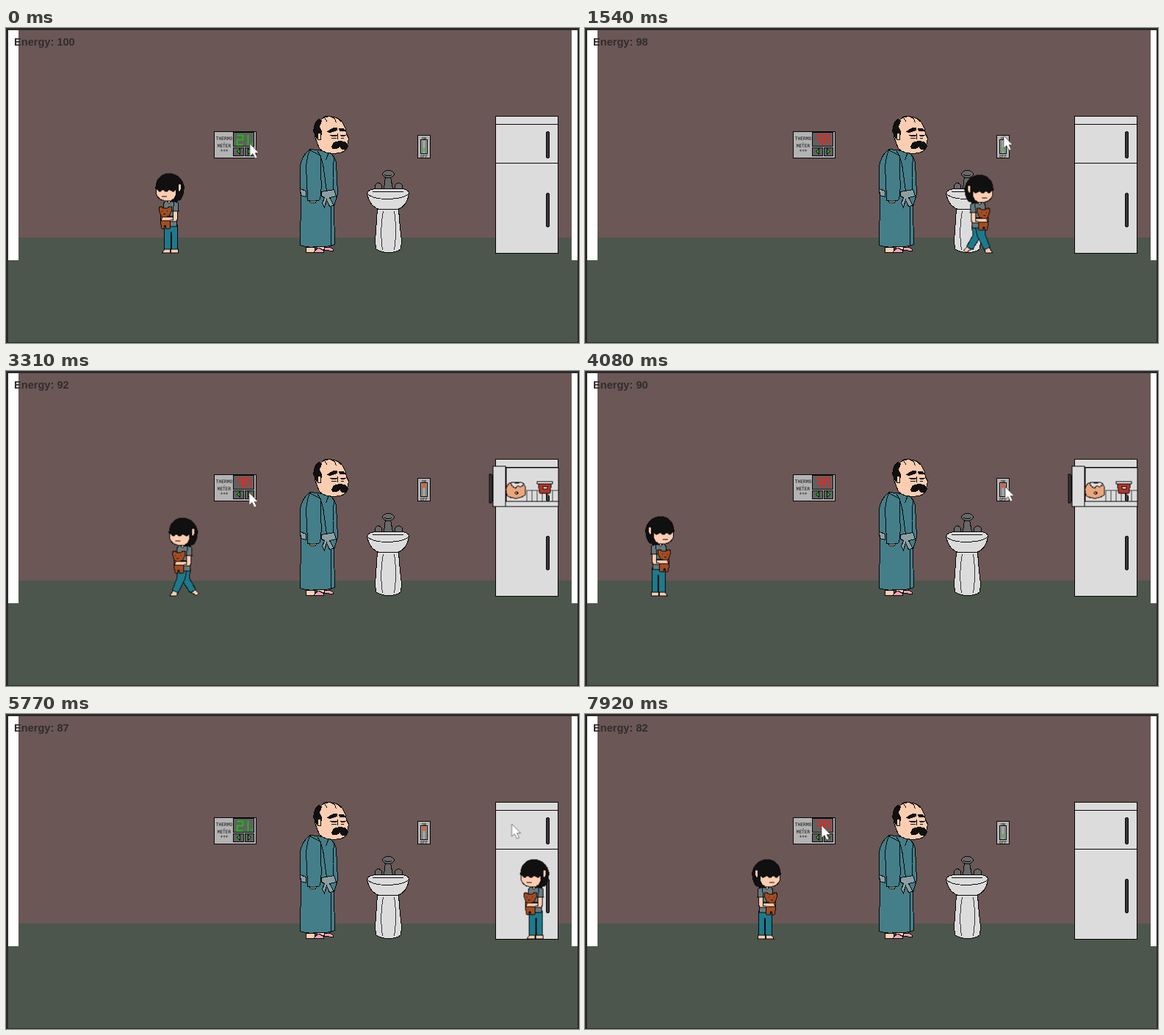
Animation of 780x430 px, one loop 8000 ms. Source, as an HTML page without scripts:

```html
<!DOCTYPE html>
<html lang="en">
<head>
<meta charset="utf-8">
<title>Room</title>
<style>
  @property --energy { syntax: "<integer>"; inherits: false; initial-value: 100; }
  html, body { margin: 0; width: 100%; height: 100%; overflow: hidden; background: #2b2b2b; }
  svg { position: absolute; left: 0; top: 0; display: block; }
  .art { stroke: #080808; stroke-width: 1; shape-rendering: crispEdges; }
  .flat { stroke: none; }
  .line { fill: none; }
  .skin { fill: #fccdb1; }
  .hair { fill: #101010; }
  .metal { fill: #686868; }
  .light { fill: #dcdcdc; }
  .robe { fill: #447e89; }
  .belt { fill: #8b9fa2; }
  .jeans { fill: #1d7a8c; }
  .shirt { fill: #667a7f; }
  .bear { fill: #a64c22; }
  .panel { fill: #b3b3b3; }
  .seg { fill: none; stroke-width: 1.4; }
  .tiny { font: 6.2px "DejaVu Sans Mono", monospace; fill: #111; stroke: none; text-anchor: middle; }

  .energy { position: absolute; left: 11px; top: 11px; font: bold 14.6px/17px "Liberation Sans", Arial, sans-serif;
    color: #312d2d; white-space: pre; counter-reset: energy var(--energy); animation: energy 8s step-end infinite; }
  .energy::after { content: counter(energy); }

  .girl { animation: pace 8s linear infinite; }
  .turn { animation: turn 8s step-end infinite; }
  .stand { animation: stand 571.4286ms step-end infinite; }
  .stride { animation: stride 571.4286ms step-end infinite; }
  .bob { animation: bob 571.4286ms step-end infinite; }
  .cursor { animation: point 8s ease-in-out infinite; }
  .cold { animation: cold 8s step-end infinite; }
  .hot { animation: hot 8s step-end infinite; }
  .on { animation: on 8s step-end infinite; }
  .off { animation: off 8s step-end infinite; }
  .open { animation: open 8s step-end infinite; }
  .water { animation: water 8s step-end infinite; }

  @keyframes pace {
    0% { transform: translateX(223px); }
    5.2%, 5.41% { transform: translateX(37px); }
    25.21%, 27.25% { transform: translateX(750px); }
    47.05%, 49.2% { transform: translateX(37px); }
    69.3%, 71.28% { transform: translateX(750px); }
    91.09%, 93.2% { transform: translateX(37px); }
    100% { transform: translateX(282px); }
  }
  @keyframes turn {
    0%, 27.2%, 71.2% { transform: scaleX(-1); }
    5.3%, 49%, 93%, 100% { transform: scaleX(1); }
  }
  @keyframes stand { 0%, 80%, 100% { opacity: 1; } 20% { opacity: 0; } }
  @keyframes stride { 0%, 80%, 100% { opacity: 0; } 20% { opacity: 1; } }
  @keyframes bob { 0%, 80%, 100% { transform: none; } 20% { transform: translateY(2px); } }
  @keyframes point {
    0%, 11.5% { transform: translate(332px, 158px); }
    18.75%, 20.4% { transform: translate(570px, 147px); }
    24.5% { transform: translate(318px, 166px); }
    26% { transform: translate(357px, 180px); }
    28.8%, 29.3% { transform: translate(690px, 150px); }
    31.75%, 33.8% { transform: translate(538px, 224px); }
    38.75%, 41.9% { transform: translate(331px, 166px); }
    46.9% { transform: translate(606px, 170px); }
    50%, 52.9% { transform: translate(572px, 158px); }
    56.5%, 57.5% { transform: translate(690px, 150px); }
    62.5% { transform: translate(348px, 165px); }
    64% { transform: translate(318px, 166px); }
    68.1% { transform: translate(570px, 155px); }
    72.5%, 73.4% { transform: translate(690px, 150px); }
    79.75%, 82.75% { transform: translate(538px, 228px); }
    87.5% { transform: translate(331px, 166px); }
    90% { transform: translate(690px, 150px); }
    92.75% { transform: translate(570px, 155px); }
    95.1% { transform: translate(401px, 190px); }
    99%, 100% { transform: translate(322px, 152px); }
  }
  @keyframes cold { 0%, 24.5%, 64% { opacity: 1; } 3.8%, 39%, 87.5%, 100% { opacity: 0; } }
  @keyframes hot { 0%, 24.5%, 64% { opacity: 0; } 3.8%, 39%, 87.5%, 100% { opacity: 1; } }
  @keyframes on { 0%, 52.9%, 92.75%, 100% { opacity: 0; } 20.4%, 68.1% { opacity: 1; } }
  @keyframes off { 0%, 52.9%, 92.75%, 100% { opacity: 1; } 20.4%, 68.1% { opacity: 0; } }
  @keyframes open { 0%, 57%, 90%, 100% { opacity: 0; } 28.8%, 72.5% { opacity: 1; } }
  @keyframes water { 0%, 33.8%, 82.75%, 100% { opacity: 0; } 31.75%, 79.75% { opacity: 1; } }
  @keyframes energy {
    0% { --energy: 100; }
    3.8% { --energy: 99; }
    14% { --energy: 98; }
    20.4% { --energy: 97; }
    24.5% { --energy: 96; }
    28.8% { --energy: 95; }
    31.75% { --energy: 94; }
    33.8% { --energy: 93; }
    39% { --energy: 92; }
    41.5% { --energy: 91; }
    48.7% { --energy: 90; }
    57% { --energy: 89; }
    64% { --energy: 88; }
    68.1% { --energy: 87; }
    72.5% { --energy: 86; }
    75.2% { --energy: 85; }
    79.75% { --energy: 84; }
    82.75% { --energy: 83; }
    87.5%, 100% { --energy: 82; }
  }
</style>
</head>
<body>
<svg width="780" height="430" viewBox="0 0 780 430">
  <!-- room -->
  <g shape-rendering="crispEdges">
    <path fill="#2b2b2b" d="M0 0H780V430H0z"/>
    <path fill="#fff" d="M3 3H778V317H3z"/>
    <path fill="#6b5756" d="M17 3H770V286H17z"/>
    <path fill="#4d564c" d="M17 286H770V317H778V429H3V317H17z"/>
  </g>

  <g class="art" transform="translate(.5 .5)">
    <!-- thermometer -->
    <path class="panel" d="M283 141H340V177H283z"/>
    <g class="tiny">
      <text x="296.5" y="152">THERMO</text>
      <text x="296.5" y="157">-</text>
      <text x="296.5" y="162">METER</text>
      <text x="296.5" y="168">+++</text>
    </g>
    <path fill="#606060" d="M309 142H337V161H309zM309 163H323V174H309zM325 163H337V174H325z"/>
    <path fill="#24b41c" d="M318 164V172L314 168zM329 164V172L333 168z"/>
    <path class="seg cold" stroke="#1fbb16" d="M314 146H322V152H314V159H322M329 145V160M334 156V160"/>
    <path class="seg hot" stroke="#f0231a" d="M314 146H322V159M315 152H322M326 159V146H332V156M334 156V159"/>

    <!-- light switch -->
    <path class="panel" d="M560 146H577V177H560z"/>
    <text class="tiny" x="568.5" y="152" style="font-size:5.5px">ON</text>
    <text class="tiny" x="568.5" y="176" style="font-size:5.5px">OFF</text>
    <path fill="#a2a2a2" d="M564 152H573V171H564z"/>
    <path class="line" d="M566 153V170M571 153V170" stroke="#777"/>
    <path class="flat off" fill="#51b458" d="M567 163H571V168H567z"/>
    <path class="flat on" fill="#d7623c" d="M566 153H571V159H566z"/>

    <!-- fridge -->
    <path class="light" d="M666 120H751V307H666zM666 131H751M666 184H751"/>
    <rect x="735" y="141" width="4" height="36" rx="2" fill="#353535"/>
    <rect x="735" y="225" width="4" height="46" rx="2" fill="#353535"/>
    <g class="open">
      <path class="light" d="M666 131H751V184H666zM680 131V177H751"/>
      <path class="line" d="M708 162H751M708 162V177M715 162V177M722 162V177M729 162V177M736 162V177M743 162V177" stroke="#444"/>
      <path class="light" d="M662 129H679V184H662z"/>
      <rect x="657" y="140" width="4" height="40" rx="2" fill="#353535"/>
      <path fill="#eaa67d" d="M684 153Q694 149 704 153Q709 161 706 169Q694 177 682 170Q677 161 684 153z"/>
      <path class="light" d="M686 153L690 151L695 153L700 151L705 154L700 158L696 156L693 160L689 157z"/>
      <path class="line" d="M692 166L694 164L697 166L694 168z"/>
      <path fill="#b43529" d="M724 153H742L740 166H726z"/>
      <path fill="#eee" d="M722 150H743V153H722zM730 157H736V160H730z"/>
    </g>

    <!-- sink -->
    <path class="light" d="M505 246L504 262L502 290L503 301Q510 306 520 306Q532 306 537 301L538 290L535 262L534 246z"/>
    <path class="line" d="M513 250Q508 275 512 303M528 250Q532 275 528 303" stroke="#333"/>
    <path class="light" d="M491 225Q493 219 505 219H536Q547 219 548 225Q546 242 533 247H507Q494 242 491 225z"/>
    <path class="line" d="M492 226Q498 233 520 233Q542 232 547 226M498 223H540"/>
    <path class="metal" d="M502 219V214Q506 208 511 214V219zM529 219V214Q534 208 539 214V219zM514 219L516 203H523L526 219z"/>
    <ellipse class="metal" cx="520" cy="199" rx="8" ry="5"/>
    <path class="line" d="M515 200Q520 203 525 200M515 223H517M522 223H524"/>
    <g class="water" fill="#8daef2">
      <path d="M496 226L502 223H516V205H523V223H534L537 226L532 229H505z" stroke="#4e659f"/>
    </g>

    <!-- man -->
    <g transform="translate(-1)">
      <path class="skin" d="M409 299H421V306H409zM424 297H440V302H424z"/>
      <path fill="#f3a0b5" d="M420 306Q421 301 427 300L433 303V306zM434 303V299H441Q447 301 446 304z"/>
      <path class="robe" d="M414 165Q403 174 401 188V220L402 231L401 296Q411 300 423 298Q438 299 448 295L447 243L452 226L450 183Q448 174 440 169L425 166z"/>
      <path class="line" d="M425 168Q432 178 434 200L437 222M440 169L436 180M443 240V296M447 176Q444 205 447 230"/>
      <path class="belt" d="M401 219L409 222V230L402 228zM430 223L447 220L450 229L441 231L447 242L441 243L437 234L434 244L431 239L434 231L430 229z"/>
      <path class="skin" d="M412 233H424L422 238H415z"/>
      <path class="robe" d="M414 166Q407 184 410 205L411 235Q420 237 428 234L430 215Q428 190 429 174z"/>
      <path class="skin" d="M425 131Q428 122 440 120Q454 121 459 129L463 138L464 144L467 150L465 160Q464 168 455 170Q436 173 427 164L421 148z"/>
      <path class="hair" d="M426 124L421 130L419 140L423 150H429L430 141L427 134L430 126z"/>
      <path class="skin" d="M425 143H429V152H425z"/>
      <path class="line" d="M428 126Q435 117 444 121M434 122L438 128M442 120L448 123L450 129M453 123L457 128"/>
      <path class="hair" d="M438 141L446 136H451V139L442 142zM454 137H460L463 140H455z"/>
      <path class="line" d="M441 146H451M443 147H450M455 146H463M456 147H461M443 150H450M456 150H460M452 143V151"/>
      <path class="hair" d="M444 161L447 156L454 154L462 155L466 160L464 165H458L455 161L451 164H445z"/>
    </g>

    <!-- girl, drawn facing right -->
    <g class="girl"><g class="turn">
      <g class="stand">
        <path class="skin" d="M-12 306V301H-2V306zM-1 306V301H7L10 306z"/>
        <path class="jeans" d="M-11 268H8L7 301H-1L-2 278L-3 301H-11z"/>
      </g>
      <g class="stride">
        <path class="skin" d="M-16 298L-21 303L-18 306L-11 302zM7 301L9 306H18L14 299z"/>
        <path class="jeans" d="M-10 269H8L3 283L-9 302L-17 298L-8 282z"/>
        <path class="jeans" d="M-5 271H8L9 283L15 299L7 302L-2 284z"/>
      </g>
      <g class="bob">
        <path class="skin" d="M-5 230H5V240H-5z"/>
        <path class="shirt" d="M-10 236L-4 234L1 239L5 234L9 240L8 270H-10z"/>
        <path class="skin" d="M-11 247H-5V256L4 258V263H-9L-11 260z"/>
        <path class="shirt" d="M-11 238L-6 236L-4 249H-12z"/>
        <path class="bear" d="M0 256H12L13 263L11 273H7V269H5V273H0L-1 263z"/>
        <path class="bear" d="M-3 244L0 243L3 245H9L12 243L15 245L14 250L12 256Q7 259 1 256L-2 250z"/>
        <path class="line" d="M3 249H4M10 249H11M6 253H9"/>
        <path class="skin" d="M-4 257L10 258L12 262L3 263L-5 261z"/>
        <path class="hair" d="M-7 200Q2 196 11 201Q20 208 19 219L17 226L4 235L-4 237L-14 234Q-20 226 -19 215Q-16 203 -7 200z"/>
        <path class="skin" d="M-9 220L-4 223L0 220L5 223L10 220L14 223L18 219V227Q15 234 8 235H-2Q-8 232 -9 225z"/>
        <path class="skin" d="M-15 212H-12V222H-14L-16 218z"/>
        <path class="line" d="M4 229H11"/>
      </g>
    </g></g>
  </g>

  <path class="cursor" d="M0 0V17L4 13.5L7 20L10 18.7L7.2 12.5H12z" fill="#fff" stroke="#4a4444" stroke-width=".7"/>
</svg>
<div class="energy">Energy: </div>
</body>
</html>
```
